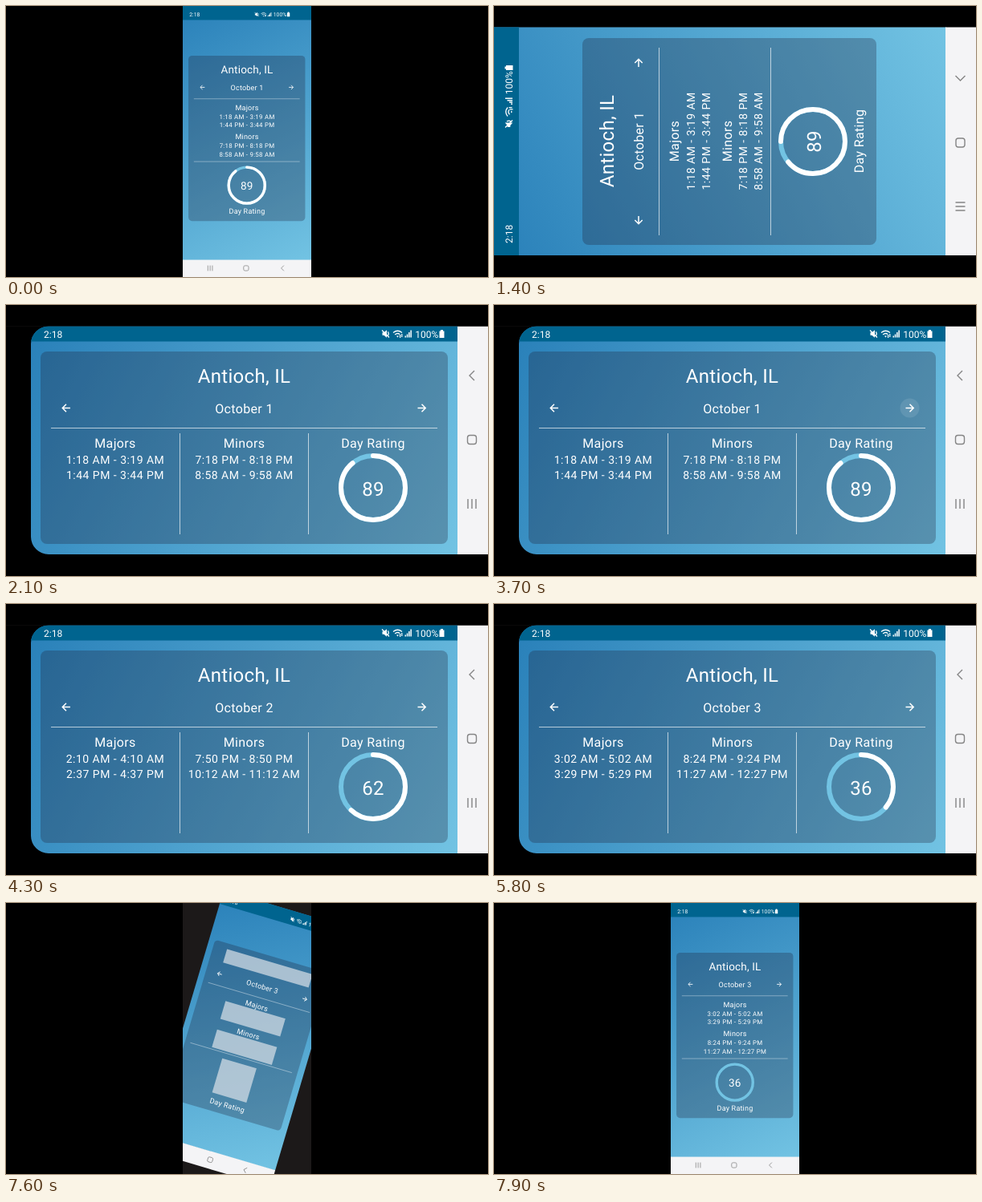
Recreate the animation shown at these times as an HTML page. Size 600 px wide and 338 px high, loop 8 s.

```html
<!DOCTYPE html>
<html lang="en">
<head>
<meta charset="utf-8">
<title>Day rating, rotating phone</title>
<style>
  html, body { margin: 0; width: 100%; height: 100%; overflow: hidden; background: #000; }
  svg { display: block; width: 600px; height: 338px; }
  text { font-family: Roboto, sans-serif; fill: #fff; text-anchor: middle; text-rendering: geometricPrecision; }
  .big { font-size: 24px; letter-spacing: .3px; }
  .mid { font-size: 16px; letter-spacing: .35px; }
  .row { font-size: 14px; letter-spacing: .48px; }
  .bar { font-size: 12px; text-anchor: start; }
  .card { fill: rgba(30, 34, 57, .3); }
  .rule { fill: none; stroke: #fff; stroke-opacity: .65; }
  .arrow { fill: none; stroke: #fff; stroke-width: 1.5; }
  .skeleton { fill: rgba(218, 226, 232, .7); }
  .track, .arc { fill: none; stroke: #72c3e3; stroke-width: 6; }
  .arc { stroke: #fff; stroke-linecap: round; }
  .status { fill: #00648f; }
  .nav { fill: #f4f4f6; }
  .keys { fill: none; stroke: #858585; stroke-width: 1.4; }
  .icon { fill: #fff; }
  .line { fill: none; stroke: #fff; stroke-width: 1.3; }
  .ripple { fill: #fff; }
  .backdrop { fill: #1c1919; }
</style>
</head>
<body>
<svg id="stage" viewBox="0 0 600 338"></svg>
<script>
const LOOP = 8000, STEP = 100;

const days = [
  { date: "October 1", rating: 89,
    rows: ["1:18 AM - 3:19 AM", "1:44 PM - 3:44 PM", "7:18 PM - 8:18 PM", "8:58 AM - 9:58 AM"] },
  { date: "October 2", rating: 62,
    rows: ["2:10 AM - 4:10 AM", "2:37 PM - 4:37 PM", "7:50 PM - 8:50 PM", "10:12 AM - 11:12 AM"] },
  { date: "October 3", rating: 36,
    rows: ["3:02 AM - 5:02 AM", "3:29 PM - 5:29 PM", "8:24 PM - 9:24 PM", "11:27 AM - 12:27 PM"] }
];

const wide = {
  card: [43, 58, 507, 240], title: [296.5, 97], date: [296.5, 135], arrows: [75, 517.5, 128.5],
  rules: "M56 153.5H537M216.5 160V286M376.5 160V286",
  majors: [136, 178], minors: [296.5, 178], ring: [457, 228], rating: [457, 178]
};
const tall = {
  card: [13, 110, 258, 366], title: [142.5, 148.5], date: [142.5, 186], arrows: [44, 240, 180],
  rules: "M25 205.5H259M25 344.5H259",
  majors: [142.5, 230], minors: [142.5, 295.5], ring: [142, 397], rating: [142.5, 460]
};

const text = ([x, y], cls, str = "") => `<text x="${x}" y="${y}" class="${cls}">${str}</text>`;
const rect = (x, y, w, h, cls, r = 0) =>
  `<rect x="${x}" y="${y}" width="${w}" height="${h}" rx="${r}" class="${cls}"/>`;
const block = ([x, y], w, h) => rect(x - w / 2, y - h / 2, w, h, "block");
const below = ([x, y], d) => [x, y + d];
const arrow = (x, y, flip) =>
  `<path class="arrow" transform="translate(${x} ${y}) scale(${flip} 1)" d="M5 0H-4.3M0 -4.7L-4.7 0L0 4.7"/>`;

function panel(o) {
  const [left, right, ay] = o.arrows, [rx, ry] = o.ring;
  return rect(...o.card, "card", 8) +
    `<path class="rule" d="${o.rules}"/>` +
    `<circle class="ripple" cx="${right}" cy="${ay}" r="12"/>` +
    arrow(left, ay, 1) + arrow(right, ay, -1) +
    text(o.date, "mid date") + text(o.majors, "mid", "Majors") +
    text(o.minors, "mid", "Minors") + text(o.rating, "mid", "Day Rating") +
    `<g class="loaded">` + text(o.title, "big", "Antioch, IL") +
    [o.majors, o.majors, o.minors, o.minors]
      .map((p, i) => text(below(p, i % 2 ? 38.5 : 19.5), "row row" + i)).join("") +
    `<circle class="track" cx="${rx}" cy="${ry}" r="40"/>
     <circle class="arc" cx="${rx}" cy="${ry}" r="40" pathLength="100" transform="rotate(-90 ${rx} ${ry})"/>` +
    text([rx, ry + 10], "big score") + `</g>
    <g class="skeleton">` + block(below(o.title, -10.5), 197, 31) + block(below(o.majors, 24.5), 138, 41) +
    block(below(o.minors, 24.5), 138, 41) + block(o.ring, 79, 79) + `</g>`;
}

// Clock on the left; mute, wifi, signal and battery starting at x
const status = (clockX, x, y) => text([clockX, y + 4.5], "bar", "2:18") +
  `<g transform="translate(${x} ${y})">
    <path class="icon" d="M-4 -1.8H-2L1.5 -4.8V4.8L-2 1.8H-4Z"/>
    <path class="line" d="M-4.5 -4.5L4.5 4.5M3 -2.6Q4.6 0 3 2.4"/>
    <path class="line" d="M9.5 -1.5Q15 -6 20.5 -1.5M11.6 1Q15 -1.8 17.6 .6"/>
    <path class="icon" d="M13.4 2.6H16.6L15 4.5ZM17.5 1H18.7V5H17.5ZM19.7 0H20.9V4H19.7Z"/>
    <path class="icon" d="M24 4.5V2.5H25.5V4.5ZM26.3 4.5V.5H27.8V4.5ZM28.6 4.5V-2H30.1V4.5ZM30.9 4.5V-4.5H32.4V4.5Z"/>
    <path class="icon" d="M67 -3.5H68.5V-5H71.5V-3.5H73V5H67Z"/>
  </g>` + text([x + 36.7, y + 4.5], "bar", "100%");

const key = (x, y, d) => `<path class="keys" transform="translate(${x} ${y})" d="${d}"/>`;
const keys = (back, home, recent) =>
  key(...back, "M3 -6L-3 0L3 6") +
  key(...home, "M-2.5 -5.5H2.5Q5.5 -5.5 5.5 -2.5V2.5Q5.5 5.5 2.5 5.5H-2.5Q-5.5 5.5 -5.5 2.5V-2.5Q-5.5 -5.5 -2.5 -5.5Z") +
  key(...recent, "M-5 -6V6M0 -6V6M5 -6V6");

const gradient = (id, x1, y1, x2, y2) =>
  `<linearGradient id="${id}" gradientUnits="userSpaceOnUse" x1="${x1}" y1="${y1}" x2="${x2}" y2="${y2}">
    <stop stop-color="#2980b9"/><stop offset="1" stop-color="#72c3e3"/></linearGradient>`;

const stage = document.getElementById("stage");
stage.innerHTML = `<defs>
  ${gradient("wideSky", 31, 26, 562, 311)}${gradient("tallSky", 0, 0, 285, 562)}
  <clipPath id="wideFrame"><rect y="26.5" width="600" height="284.5"/></clipPath>
  <clipPath id="tallFrame"><rect x="220" width="160" height="338"/></clipPath>
  <clipPath id="glass"><path d="M562 26.5H53A22 22 0 0 0 31 48.5V289A22 22 0 0 0 53 311H562Z"/></clipPath>
  <g id="wideBody">
    <rect y="26.5" width="600" height="284.5"/>
    <g clip-path="url(#glass)">
      <rect x="31" y="26" width="531" height="286" fill="url(#wideSky)"/>
      ${rect(31, 26, 531, 19.5, "status")}
    </g>
    ${panel(wide)}
    ${rect(562, 26.5, 38, 284.5, "nav")}
  </g>
  <g id="widePhone">
    <use href="#wideBody"/>
    ${status(47, 472.5, 36)}${keys([580, 88], [580, 168], [580, 248])}
  </g>
  <g id="tallPhone">
    <rect width="285" height="563" fill="url(#tallSky)"/>
    ${rect(0, 0, 285, 31, "status")}${panel(tall)}${rect(0, 562, 285, 38.5, "nav")}
    ${status(15, 164, 18.5)}${keys([221, 580.5], [140.5, 580.5], [61, 580.5])}
  </g>
</defs>
<g id="wideView" clip-path="url(#wideFrame)">
  ${rect(0, 0, 600, 338, "backdrop")}
  <use id="ghost" href="#wideBody" x="-30.5"/>
  <use id="wideSpin" href="#widePhone"/>
  <use id="turned" href="#tallPhone" transform="matrix(0 -1 1 0 0 311)"/>
</g>
<g id="tallView" clip-path="url(#tallFrame)">
  ${rect(220, 0, 160, 338, "backdrop")}
  <g id="tallSpin"><use href="#tallPhone" transform="translate(219.75) scale(.5633)"/></g>
</g>`;

const byId = id => document.getElementById(id);
const each = (sel, fn) => stage.querySelectorAll(sel).forEach(fn);
const show = (node, on) => { node.style.display = on ? "" : "none"; };
const within = (t, a, b) => t >= a && t < b;
const progress = (t, start, span) => Math.min(1, Math.max(0, (t - start) / span));
const spin = (t, start) => 90 * (1 - progress(t, start, 400)) ** 2.45;

// [start, duration, from, to]
const sweeps = [[1800, 300, 0, 89], [3800, 500, 89, 62], [5400, 400, 62, 36], [7900, 600, 0, 36]];

function ringValue(t) {
  const sweep = sweeps.filter(s => t >= s[0]).pop();
  if (!sweep) return 89;
  const [start, span, from, to] = sweep;
  return from + (to - from) * (1 - (1 - progress(t, start, span)) ** 2);
}

function ripple(t) {
  const age = t < 5300 ? t - 3700 : t - 5300;
  return within(age, 0, 400) ? .1 * (1 - age / 400) : 0;
}

function draw(t) {
  const day = days[t < 3800 ? 0 : t < 5400 ? 1 : 2];
  const upright = t < 1300 || t >= 7500;
  const turned = within(t, 1300, 1500);
  const leaving = within(t, 7400, 7500);
  const loading = within(t, 1500, 1800) || within(t, 7500, 7900);
  const value = ringValue(t);

  show(byId("tallView"), upright);
  show(byId("wideView"), !upright);
  show(byId("turned"), turned);
  show(byId("wideSpin"), !turned);
  show(byId("ghost"), leaving);
  byId("wideSpin").setAttribute("transform",
    leaving ? "matrix(0 1 -1 0 311 26)" : `rotate(${-spin(t, 1400)} 300 168.5)`);
  byId("tallSpin").setAttribute("transform", `rotate(${t < 7500 ? 0 : spin(t, 7400)} 300 169)`);

  each(".loaded", n => show(n, !loading));
  each(".skeleton", n => show(n, loading));
  each(".date", n => { n.textContent = day.date; });
  each(".score", n => { n.textContent = day.rating; });
  day.rows.forEach((row, i) => each(".row" + i, n => { n.textContent = row; }));
  each(".arc", n => {
    n.setAttribute("stroke-dasharray", `${value} 100`);
    show(n, value > 0);
  });
  each(".ripple", n => n.setAttribute("opacity", ripple(t)));
}

const begin = performance.now();
let last = -1;
function tick() {
  const t = Math.floor((performance.now() - begin) % LOOP / STEP) * STEP;
  if (t !== last) draw(last = t);
  requestAnimationFrame(tick);
}
tick();
</script>
</body>
</html>
```
